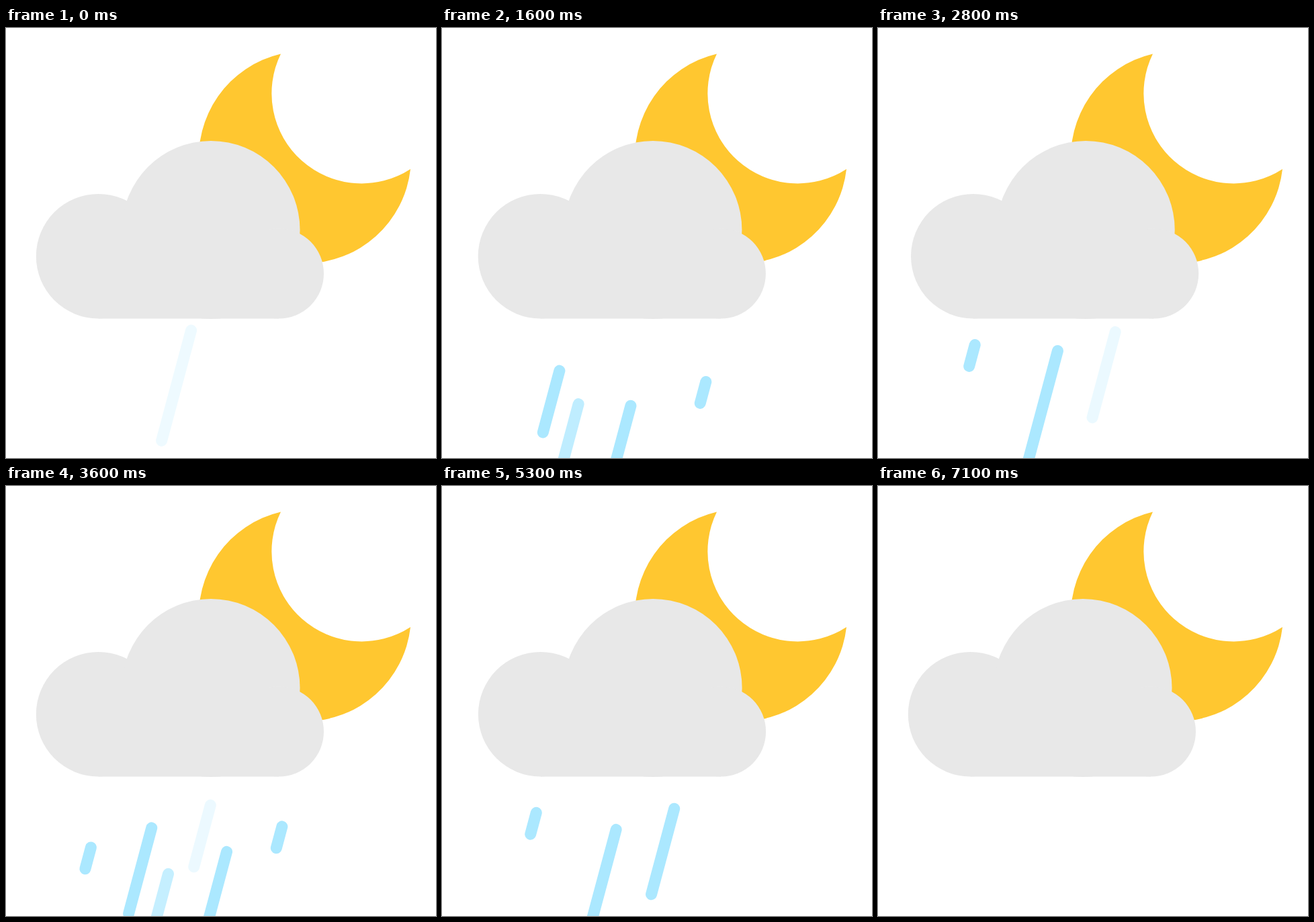
Write an HTML page that moves like this. It is 640 by 640 pixels and loops after 7.2 s.

```html
<!DOCTYPE html>
<html lang="en">
<head>
<meta charset="utf-8">
<title>Night rain</title>
<style>
  html, body { margin: 0; width: 100%; height: 100%; overflow: hidden; background: #fff; }
  svg { display: block; width: 100vw; height: 100vh; }
  #rain { stroke: #abe8ff; stroke-width: 17; stroke-linecap: round; }
</style>
</head>
<body>
<svg viewBox="0 0 640 640">
  <path fill="#ffc730" d="M409 38.5A158 158 0 1 0 602 210A134 134 0 0 1 409 38.5Z"/>
  <g id="rain"></g>
  <g id="cloud" fill="#e8e8e8">
    <circle cx="137.6" cy="339.7" r="92.8"/>
    <circle cx="305" cy="300.5" r="132.5"/>
    <circle cx="406" cy="365.5" r="67"/>
    <path d="M137.6 300H406V432.5H137.6Z"/>
  </g>
</svg>
<script>
const LOOP = 7200, STEP = 100, LIFE = 1200, FADE = 170;
const ANGLE = Math.PI / 12, TAN = Math.tan(ANGLE);

// x where the track crosses y = 450, length, first y, px per second, start times
const drops = [
  { x: 275.6, len: 170, y: 446, speed: 121, starts: [2515, 4760, 7167] },
  { x: 353.8, len: 132, y: 448, speed: 115, starts: [120, 2762, 5020] },
  { x: 150, len: 33, y: 456, speed: 83, starts: [295, 2613, 4935] },
  { x: 232.5, len: 132, y: 461, speed: 92, starts: [528, 3080, 5455] },
  { x: 413.3, len: 33, y: 451, speed: 83, starts: [690, 5410] },
  { x: 426.1, len: 33, y: 479.5, speed: 83, starts: [3270] },
  { x: 311, len: 95, y: 471, speed: 109, starts: [763, 3563, 5845] },
  { x: 191, len: 95, y: 460, speed: 109, starts: [1140, 3855] }
];

// cloud drift: time, offset
const drift = [[0, 0], [1780, 9.9], [3560, 0], [3640, 0], [5370, 9.5], [7100, 0], [LOOP, 0]];

const mod = (a, n) => ((a % n) + n) % n;
const cloud = document.getElementById("cloud");
const rain = document.getElementById("rain");

for (const d of drops) {
  d.line = document.createElementNS("http://www.w3.org/2000/svg", "line");
  d.line.setAttribute("x2", -d.len * Math.sin(ANGLE));
  d.line.setAttribute("y2", d.len * Math.cos(ANGLE));
  rain.append(d.line);
}

function driftAt(t) {
  const i = drift.findIndex(k => k[0] > t);
  const [t0, a] = drift[i - 1], [t1, b] = drift[i];
  return a + (b - a) * (t - t0) / (t1 - t0);
}

function drawDrop(d, t) {
  const age = Math.min(...d.starts.map(s => mod(t - s, LOOP)));
  const alpha = Math.max(0, Math.min(1, age / FADE, (LIFE - age) / FADE));
  const y = d.y + d.speed * age / 1000;
  const x = d.x - (y - 450) * TAN;
  d.line.setAttribute("opacity", alpha);
  d.line.setAttribute("transform", `translate(${x} ${y})`);
}

const origin = performance.now();

function draw() {
  const now = mod(performance.now() - origin, LOOP);
  const t = Math.floor(now / STEP) * STEP;
  cloud.setAttribute("transform", `translate(${driftAt(t)} 0)`);
  for (const d of drops) drawDrop(d, t);
  requestAnimationFrame(draw);
}
draw();
</script>
</body>
</html>
```
